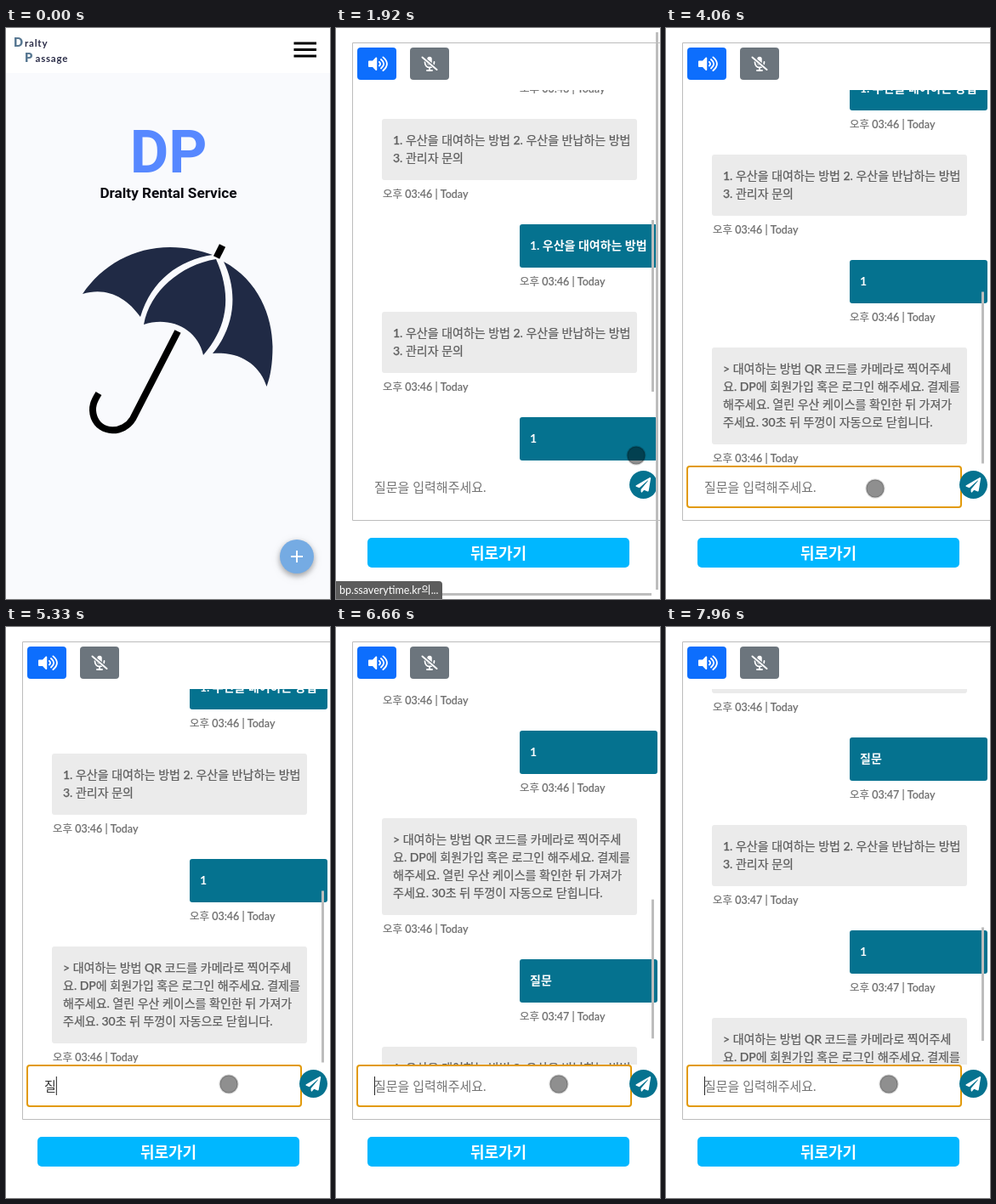
An HTML page for the animation above (7.99 s loop, 381 by 672 pixels).

```html
<!DOCTYPE html>
<html lang="ko">
<head>
<meta charset="utf-8">
<title>Umbrella rental</title>
<style>
html, body { margin: 0; width: 381px; height: 672px; overflow: hidden; background: #fff }
svg { display: block }
#chat { font-family: Lato, "Noto Sans CJK KR", "Noto Sans CJK", sans-serif }
#home { font-family: Roboto, sans-serif; font-weight: 700 }
.msg { font-size: 14px; font-weight: 500; fill: #5f5f5f; stroke: #5f5f5f; stroke-width: .25px }
.mine { font-weight: 700; fill: #fff; stroke: none }
.stamp { font-size: 12.5px; font-weight: 500; fill: #707070; stroke: #707070; stroke-width: .2px }
.fab { filter: drop-shadow(0 3px 3px #0004) drop-shadow(0 2px 5px #0002) }
</style>
</head>
<body>
<svg width="381" height="672" viewBox="0 0 381 672">
  <clipPath id="view"><path d="M20 73H381V515H20Z"/></clipPath>

  <g id="home">
    <path fill="#f9fafd" d="M0 0H381V672H0Z"/>
    <path fill="#fff" d="M0 0H381V53H0Z"/>
    <g font-family="Lato, sans-serif" font-size="11.5" letter-spacing=".8" fill="#2b2d48">
      <text x="22" y="22">ralty</text><text x="34.5" y="40">assage</text>
      <g font-size="14.5" font-weight="900" fill="#587892"><text x="9" y="22">D</text><text x="22" y="40">P</text></g>
    </g>
    <path stroke="#000" stroke-width="3" d="M338.500 18H365M338.500 25.500H365M338.500 33H365"/>
    <g text-anchor="middle">
      <text x="191" y="170" font-size="70" fill="#5788ff">DP</text>
      <text x="191" y="200" font-size="17.2" fill="#0b0b12">Dralty Rental Service</text>
    </g>
    <g fill="#202a45">
      <path d="M90 313C113 279 150 258 193 258C212 258 229 262 243 267C203 273 171 297 158 340C142 317 118 304 90 313Z"/>
      <path d="M247 272C205 279 169 310 162 349C192 339 225 353 232 385C265 347 263 308 247 272Z"/>
      <path d="M256 275C297 297 313 339 313.500 375C313.500 395 311 410 306.500 422C299 397 275 380 243 383C271 349 272 308 256 275Z"/>
    </g>
    <g fill="none" stroke="#000" stroke-width="8">
      <path d="M247.500 270L254.500 256"/>
      <path d="M202 357L149 460C138 478 111 478 103.500 458C99.500 446 104 438 109 430"/>
    </g>
    <g id="actions" fill="#5f5f5f"></g>
    <g class="fab"><circle id="fab" cx="342" cy="622" r="20"/></g>
    <path id="plus" stroke="#fff" stroke-width="2" d="M335 622H349M342 615V629"/>
  </g>

  <g id="chat">
    <path fill="#fff" d="M0 0H381V672H0Z"/>
    <path fill="none" stroke="#bcbcbc" d="M382 17.500H19.500V579.500H382"/>
    <g clip-path="url(#view)"><g id="log"></g></g>
    <rect id="thumb" x="371" width="3" fill="#bdbdbd"/>
    <rect x="25" y="23" width="46" height="38" rx="4" fill="#0d6efd"/>
    <g transform="translate(38 32) scale(.04)" fill="#fff">
      <path d="M215 71L126 160H24Q0 160 0 184V328Q0 352 24 352H126L215 441C230 456 256 445 256 424V88C256 67 230 56 215 71Z"/>
      <path fill="none" stroke="#fff" stroke-width="48" stroke-linecap="round" d="M322 200Q385 256 322 312M374 125Q535 256 374 387M435 60Q660 256 435 452"/>
    </g>
    <rect x="87" y="23" width="46" height="38" rx="4" fill="#6c757d"/>
    <g fill="none" stroke="#fff" stroke-linecap="round">
      <path stroke-width="5.500" d="M110 36.500V41"/>
      <path stroke-width="1.800" d="M104.500 40C104.500 48.500 115.500 48.500 115.500 40M110 46.500V49.500M107 50H113"/>
      <path stroke="#6c757d" stroke-width="4" d="M102 35L119 48.500"/>
      <path stroke-width="2" d="M101.500 34.500L118.500 49"/>
    </g>
    <rect id="field" x="25" y="516" width="322" height="48" rx="3" fill="#fff" stroke="#e29a0b" stroke-width="2"/>
    <text id="entry" x="45" y="546" font-size="15"></text>
    <path id="caret" stroke="#222" d="M45.500 529V551"/>
    <circle cx="361.500" cy="537.500" r="16.500" fill="#05728f"/>
    <path fill="#fff" transform="translate(352.500 529) scale(.0345)" d="M476 3L12 271C-6 281-3 306 15 314L121 358L408 105C414 100 422 108 417 114L176 407V488C176 511 204 520 218 503L282 426L407 478C421 484 437 475 440 460L512 28C516 8 493-7 476 3Z"/>
    <rect x="37" y="600" width="308" height="35" rx="5" fill="#00b7ff"/>
    <text x="191" y="624.500" font-size="18" font-weight="700" fill="#fff" text-anchor="middle">뒤로가기</text>
    <path id="bars" fill="none" stroke="#bdbdbd" stroke-width="3" d="M377.500 5V661M0 666.500H371"/>
  </g>

  <g id="status" font-family="Lato, 'Noto Sans CJK KR', 'Noto Sans CJK', sans-serif">
    <path fill="#5c5c5c" d="M0 651H121Q125 651 125 655V672H0Z"/>
    <text x="4" y="666" font-size="12.500" fill="#fff">bp.ssaverytime.kr의...</text>
  </g>
  <g id="cursor">
    <circle id="dot" r="10" stroke-width="2"/>
  </g>
</svg>
<script>
const $ = id => document.getElementById(id);
const set = (id, attrs) => { for (const k in attrs) $(id).setAttribute(k, attrs[k]); };
const show = (id, on) => set(id, { opacity: +on });
const clamp = x => Math.min(1, Math.max(0, x));
const ramp = (t, start, length) => clamp((t - start) / length);
const ease = x => x * x * (3 - 2 * x);
const mix = (a, b, x) => a + (b - a) * x;

const LOOP = 7990, VIEW_TOP = 73, VIEW_HEIGHT = 442;

// Chat log: each entry is [lines, minute, mine]
const menu = ['1. 우산을 대여하는 방법 2. 우산을 반납하는 방법', '3. 관리자 문의'];
const howTo = [
  '&gt; 대여하는 방법 QR 코드를 카메라로 찍어주세',
  '요. DP에 회원가입 혹은 로그인 해주세요. 결제를',
  '해주세요. 열린 우산 케이스를 확인한 뒤 가져가',
  '주세요. 30초 뒤 뚜껑이 자동으로 닫힙니다.'];
const messages = [
  [menu, 46], [menu, 46], [['질문'], 46, true], [menu, 46],
  [['1. 우산을 대여하는 방법'], 46, true], [menu, 46],
  [['1'], 46, true], [howTo, 46],
  [['질문'], 47, true], [menu, 47],
  [['1'], 47, true], [howTo, 47]];

let nextY = 23;
$('log').innerHTML = messages.map(([lines, minute, mine]) => {
  const x = mine ? 216 : 54, height = 30 + 21 * lines.length, y = nextY;
  nextY += height + 52;
  return `<rect x="${x}" y="${y}" width="${mine ? 162 : 300}" height="${height}" rx="3" fill="${mine ? '#05728f' : '#ebebeb'}"/>` +
    lines.map((s, i) => `<text class="msg ${mine ? 'mine' : ''}" x="${x + (mine ? 12 : 13)}" y="${y + 30 + 21 * i}">${s}</text>`).join('') +
    `<text class="stamp" x="${x + (mine ? 0 : 1)}" y="${y + height + 21}">오후 03:${minute} | Today</text>`;
}).join('');

// Speed dial buttons, lower one first
const icons = [
  'M20.500 3L15 5.100 9 3 3.400 4.900Q3 5 3 5.400V20.500Q3 21 3.500 21L9 18.900 15 21 20.600 19.100Q21 19 21 18.600V3.500Q21 3 20.500 3ZM10 5.500L14 6.900V18.500L10 17.100ZM5 6.500L8 5.500V17.100L5 18.300ZM19 17.500L16 18.500V6.900L19 5.700Z',
  'M19 2H5Q3 2 3 4V18Q3 20 5 20H9L12 23 15 20H19Q21 20 21 18V4Q21 2 19 2ZM13 18H11V16H13ZM15.070 10.250L14.170 11.170C13.450 11.900 13 12.500 13 14H11V13.500C11 12.400 11.450 11.400 12.170 10.670L13.410 9.410A2 2 0 1 0 10 8H8A4 4 0 1 1 15.070 10.250Z'];
$('actions').innerHTML = icons.map((d, i) =>
  `<g id="action${i}"><circle class="fab" r="20" fill="#fff"/><path transform="translate(-12 -12)" fill-rule="evenodd" d="${d}"/></g>`).join('');

// Scroll moves: start, duration, target, content height
const scrolls = [[1741, 300, 525, 967], [6499, 265, 752, 1194], [7773, 300, 1021, 1463]];
// Cursor moves: start, end, x, y
const moves = [[550, 950, 353, 503], [3080, 3250, 246, 569], [3430, 3600, 246, 542], [4590, 4740, 262, 538]];
// Text field: time, typed text
const typing = [[0, ''], [5040, 'ㅈ'], [5140, '지'], [5240, '질'], [5660, '질ㅁ'], [5800, '질무'], [5950, '질문'],
  [6410, ''], [7490, '1'], [7785, '']];

function drawHome(t) {
  const open = ease(ramp(t, 200, 250));
  set('fab', { fill: `rgb(${[[117, 25], [171, 118], [227, 210]].map(([a, b]) => mix(a, b, open))})` });
  set('plus', { transform: `rotate(${45 * open} 342 622)` });
  icons.forEach((_, i) => {
    const size = ease(ramp(t, 280 + 40 * i, 220));
    set('action' + i, { transform: `translate(342 ${558 - 56 * i}) scale(${size})`, opacity: size });
  });
}

function drawChat(t) {
  let scroll = 0, height = scrolls[0][3];
  for (const [start, length, target, h] of scrolls) if (t >= start) {
    scroll = mix(scroll, target, ease(ramp(t, start, length)));
    height = h;
  }
  set('log', { transform: `translate(0 ${VIEW_TOP - Math.round(scroll)})` });
  set('thumb', { y: VIEW_TOP - 2.5 + scroll * VIEW_HEIGHT / height, height: VIEW_HEIGHT ** 2 / height });
  show('bars', 1 - ramp(t, 2040, 180));
  set('field', { 'stroke-opacity': ramp(t, 3560, 160) });

  const [, text] = typing.findLast(([start]) => t >= start);
  $('entry').textContent = text || '질문을 입력해주세요.';
  set('entry', { fill: text ? '#333' : '#757575' });
  const caretX = text ? $('entry').getComputedTextLength() : 0;
  const blinkOff = (t >= 4060 && t < 4560) || (t >= 6970 && t < 7460);
  set('caret', { transform: `translate(${caretX} 0)`, opacity: +(t >= 3560 && !blinkOff) });
}

function drawCursor(t) {
  let x = 366, y = 640;
  for (const [start, end, toX, toY] of moves) {
    const k = ease(ramp(t, start, end - start));
    x = mix(x, toX, k);
    y = mix(y, toY, k);
  }
  const pressed = (t >= 1500 && t < 1680) || (t >= 3540 && t < 3680);
  set('cursor', { transform: `translate(${x} ${y})`, opacity: ramp(t, 450, 80) });
  set('dot', pressed
    ? { r: 11, fill: '#c8c800b8', stroke: '#c8c80060' }
    : { r: 10.5, fill: '#00000070', stroke: '#0000002c' });
}

function frame(now) {
  const t = now % LOOP, chatting = t >= 1710;
  $('home').style.display = chatting ? 'none' : '';
  $('chat').style.display = chatting ? '' : 'none';
  show('status', t >= 1650 && t < 2130);
  if (chatting) drawChat(t); else drawHome(t);
  drawCursor(t);
  requestAnimationFrame(frame);
}
requestAnimationFrame(frame);
</script>
</body>
</html>
```
